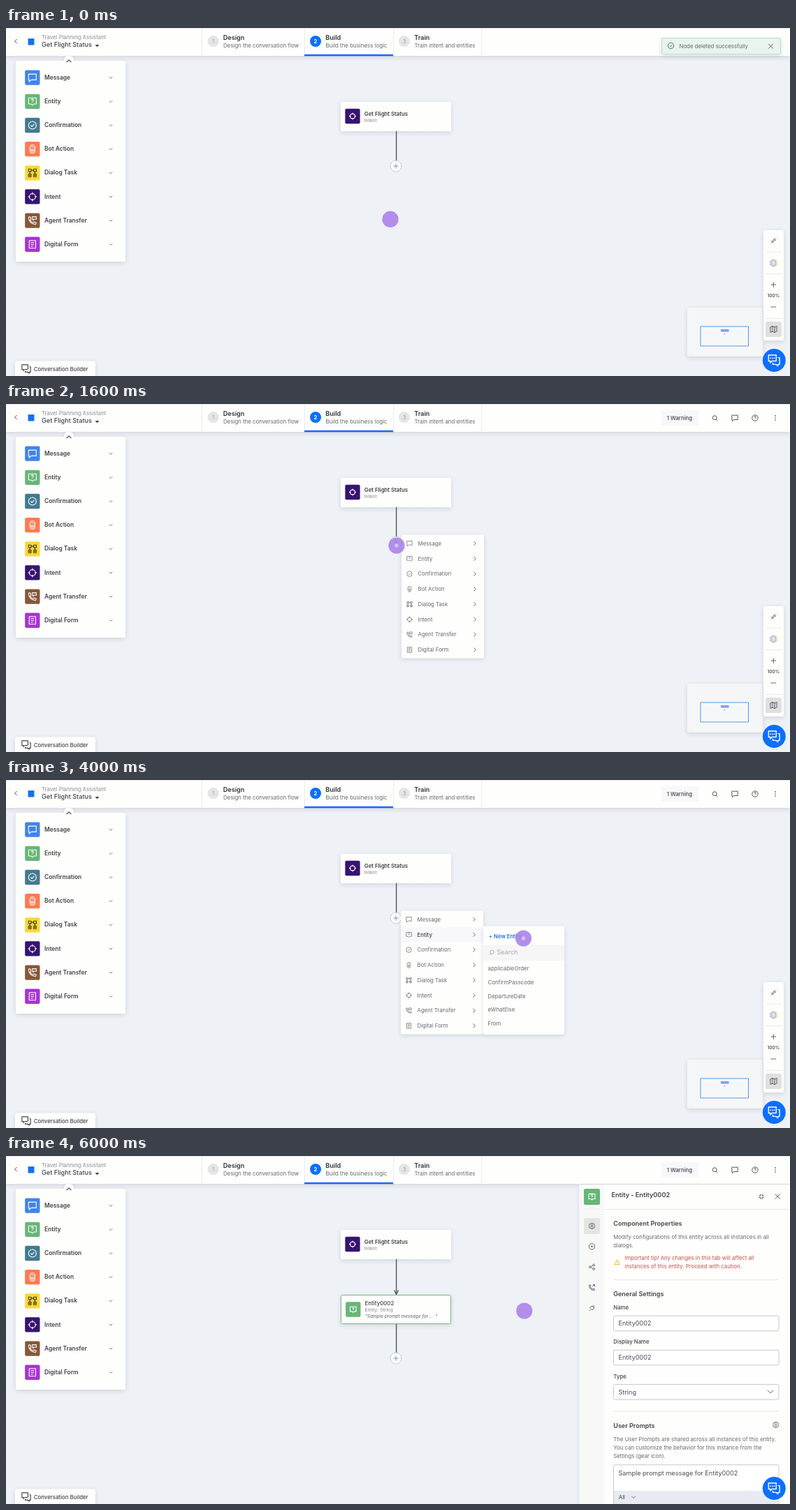
Write an HTML page with a canvas that moves like this. It is 1122 px wide and 499 px high and loops after 6400 ms.

```html
<!DOCTYPE html>
<html lang="en">
<head>
<meta charset="utf-8">
<title>Flow builder</title>
<style>
html, body { margin: 0; width: 100%; height: 100%; overflow: hidden; background: #eef1f5; }
canvas { display: block; width: 1122px; height: 499px; }
</style>
</head>
<body>
<canvas id="stage"></canvas>
<script>
const W = 1122, H = 499, LOOP = 6400;
const canvas = document.getElementById('stage');
const ratio = window.devicePixelRatio || 1;
canvas.width = W * ratio;
canvas.height = H * ratio;
const c = canvas.getContext('2d');

const INK = '#404247', GREY = '#66696f', BLUE = '#0d6efd', PAPER = '#fefefd', GREEN = '#67b577';

// Icons are drawn around 0,0 in a box of about 12 units.
const RING = 'M6 0A6 6 0 1 1-6 0A6 6 0 1 1 6 0';
const ICONS = {
  message: 'M-6-5.5H6V3.5H-2L-5 6.5V3.5H-6Z',
  entity: 'M-6-5.5H6V4H2L0 6L-2 4H-6ZM-1.5-2Q-1.5-3.5 0-3.5T1.5-2Q1.5-1 0-.4V.4M0 1.6V2.2',
  confirm: RING + 'M-2.7 0L-.7 2L3-2',
  bot: 'M-4-1V-3L-2-6H2L4-3V-1L2 1H-2ZM-1.5-2.5H1.5M-5 1L-3 3H3L5 1M-4 4L-2 6H2L4 4',
  dialog: 'M-6-6h4v4h-4ZM2-6h4v4h-4ZM-6 2h4v4h-4ZM2 2h4v4h-4ZM-2-4H2M-4-2V2M4-2V2M-5 4H-3M3 4H5',
  intent: 'M4.8 0A4.8 4.8 0 1 1-4.8 0A4.8 4.8 0 1 1 4.8 0M0-7V-3.4M0 7V3.4M-7 0H-3.4M7 0H3.4',
  agent: 'M-6-5L-3.5-6L-2-2.5L-3.5-1Q-1.5 2.5 1 3.5L2.5 2L6 3.5L5 6Q-5.5 5-6-5ZM0-6H6V-2H2.5L1-.5V-2H0Z',
  form: 'M-5-6H5V6H-5ZM-2.5-3H2.5M-2.5 0H2.5M-2.5 3H1',
  cross: 'M-5-5L5 5M5-5L-5 5',
  plus: 'M-6 0H6M0-6V6',
  minus: 'M-6 0H6',
  search: 'M4-1A4.5 4.5 0 1 1-5-1A4.5 4.5 0 1 1 4-1M2.5 2.5L6 6',
  lens: 'M-4-1A4.5 4.5 0 1 1 5-1A4.5 4.5 0 1 1-4-1M-2.5 2.5L-6 6',
  help: RING + 'M-1.8-1.5Q-1.8-3.3 0-3.3T1.8-1.5Q1.8-.5 0 .4V1.2M0 2.7V3.4',
  gear: 'M2 0A2 2 0 1 1-2 0A2 2 0 1 1 2 0M-1.5-6H1.5L2-4L4.4-4.4L6-1.5L4.7 0L6 1.5L4.4 4.4L2 4L1.5 6H-1.5L-2 4L-4.4 4.4L-6 1.5L-4.7 0L-6-1.5L-4.4-4.4L-2-4Z',
  target: RING + 'M-2 0H2M0-2V2',
  share: 'M-2 0A2 2 0 1 1-6 0A2 2 0 1 1-2 0M6-4A2 2 0 1 1 2-4A2 2 0 1 1 6-4M6 4A2 2 0 1 1 2 4A2 2 0 1 1 6 4M-2 0L2-4M-2 0L2 4',
  call: 'M-6-5L-3.5-6L-2-2.5L-3.5-1Q-1.5 2.5 1 3.5L2.5 2L6 3.5L5 6Q-5.5 5-6-5ZM1-2L6-6M6-2V-6H2',
  plug: 'M-6 6L-3 3M-4-1L1 4Q5 2 4-2L2-4Q-2-5-4-1M1-3L4-6M3-1L6-4',
  shrink: 'M-6 6L-1 1M-5 1H-1V5M6-6L1-1M5-1H1V-5',
  corners: 'M-6-2H-2V-6M6-2H2V-6M-6 2H-2V6M6 2H2V6',
  map: 'M-6-4L-2-6L2-4L6-6V4L2 6L-2 4L-6 6ZM-2-6V4M2-4V6',
  chats: 'M-6-6H3V1H-2L-4 3V1H-6ZM5-3H7V5H5V7L3 5H-1V3',
  down: 'M-3-1.5L0 1.5L3-1.5',
  up: 'M-3 1.5L0-1.5L3 1.5',
  left: 'M1.5-3L-1.5 0L1.5 3',
  right: 'M-1.5-3L1.5 0L-1.5 3'
};
const paths = {};
for (const name in ICONS) paths[name] = new Path2D(ICONS[name]);

const KINDS = [
  ['Message', 'message', '#4083ee'],
  ['Entity', 'entity', GREEN],
  ['Confirmation', 'confirm', '#447a91'],
  ['Bot Action', 'bot', '#fd7b50'],
  ['Dialog Task', 'dialog', '#fcd735'],
  ['Intent', 'intent', '#36146f'],
  ['Agent Transfer', 'agent', '#845839'],
  ['Digital Form', 'form', '#a833d3']
];

const POINTER = [
  [0, 550, 274.2], [400, 553, 257], [600, 555, 222], [800, 559, 203],
  [1800, 600, 214.5], [2000, 625, 224], [2200, 640, 225.7],
  [3600, 698, 228], [3800, 737, 229], [4000, 740.5, 227], [4400, 741.8, 222]
];

function icon(name, x, y, scale, color, weight = .9) {
  c.save();
  c.translate(x, y);
  c.scale(scale, scale);
  c.strokeStyle = color;
  c.lineWidth = weight / scale;
  c.lineJoin = 'round';
  c.stroke(paths[name]);
  c.restore();
}

// y is the middle of the capital letters.
function text(str, x, y, size = 7.8, color = GREY, weight = 400, style = '') {
  c.font = `${style} ${weight} ${size}px Inter, sans-serif`;
  c.fillStyle = color;
  c.fillText(str, x, y + size * .364);
}

function box(x, y, w, h, fill, radius = 0, border) {
  c.beginPath();
  c.roundRect(x, y, w, h, radius);
  if (fill) { c.fillStyle = fill; c.fill(); }
  if (border) { c.strokeStyle = border; c.lineWidth = 1; c.stroke(); }
}

function card(x, y, w, h, radius = 2, fill = PAPER) {
  c.save();
  c.shadowColor = 'rgba(50,52,60,.15)';
  c.shadowBlur = 6 * ratio;
  c.shadowOffsetY = 2 * ratio;
  box(x, y, w, h, fill, radius);
  c.restore();
}

function disc(x, y, r, fill, border, dash = []) {
  c.beginPath();
  c.arc(x, y, r, 0, 7);
  if (fill) { c.fillStyle = fill; c.fill(); }
  if (border) {
    c.strokeStyle = border;
    c.lineWidth = 1;
    c.setLineDash(dash);
    c.stroke();
    c.setLineDash([]);
  }
}

function rule(x, y, w, color = '#e8e8ea') { box(x, y, w, 1, color); }

function tile(kind, x, y, size, scale) {
  const [, name, color] = KINDS[kind];
  box(x - size / 2, y - size / 2, size, size, color, 2);
  icon(name, x, y, scale, name === 'dialog' ? '#3f3a20' : '#fff', 1.1);
}

function grid() {
  box(0, 0, W, H, '#eef1f5');
  c.fillStyle = '#e2e5ea';
  for (let y = 63; y < H; y += 22.5)
    for (let x = 2; x < W; x += 22.5) c.fillRect(Math.round(x), Math.round(y), 1, 1);
}

function header() {
  card(0, 0, W, 40, 0);
  rule(0, 0, W, '#ececec');
  icon('left', 14, 19, 1, INK);
  box(31.5, 15, 9, 9.5, '#1673ea', 1);
  text('Travel Planning Assistant', 51, 13, 7.8, '#8b8d92');
  text('Get Flight Status', 51, 23.8, 9.1, INK, 500);
  c.fillStyle = INK;
  c.fill(new Path2D('M127.5 24H133.5L130.5 27.3Z'));

  for (const x of [280, 427, 554, 680]) box(x, 0, 1, 40, '#ececee');
  const steps = [
    [296.5, 'Design', 'Design the conversation flow'],
    [443, 'Build', 'Build the business logic'],
    [570, 'Train', 'Train intent and entities']
  ];
  steps.forEach(([x, title, note], i) => {
    const on = i === 1;
    disc(x, 19, 8, on ? BLUE : '#e5e5e6');
    c.textAlign = 'center';
    text(String(i + 1), x, 19.2, 7.6, on ? '#fff' : '#98999d', on ? 700 : 400);
    c.textAlign = 'left';
    text(title, x + 14.2, 13.3, 9.1, '#303237', 600);
    text(note, x + 14.4, 25, 7.9);
  });
  box(427, 37.8, 127, 2.4, BLUE);
}

function actions() {
  box(938, 9, 53, 22, '#f8f8fb', 2);
  text('1 Warning', 945.7, 20, 7.8, INK, 500);
  icon('search', 1014.5, 20.3, .65, INK);
  icon('message', 1043, 20, .7, INK);
  icon('help', 1072, 20, .71, INK);
  for (const y of [16.9, 20, 23.1]) disc(1101, y, .8, INK);
}

function toast() {
  card(938, 14, 171, 24, 2, '#e8f4ed');
  box(938.5, 14.5, 170, 23, null, 2, '#b9dec8');
  icon('confirm', 951.5, 25.3, .68, '#38694e');
  text('Node deleted successfully', 963.5, 26.2, 7.84, '#646a67');
  icon('cross', 1094.5, 26.2, .68, '#4c5851');
}

function palette() {
  card(82.5, 39.5, 15, 15, 7.5);
  card(14, 47, 157, 288);
  icon('up', 90, 47.5, 1.1, INK, 1.2);
  KINDS.forEach(([label], i) => {
    const y = 71.2 + i * 34.15;
    tile(i, 37.8, y, 21.3, .92);
    text(label, 55, y - .4, 8.42, INK, 600);
    icon('down', 150, y, .7, '#66686d');
  });
}

function plusButton(y) {
  disc(558, y, 7.8, PAPER, '#a4a7ac', [1.6, 1.2]);
  icon('plus', 558, y, .6, '#5ba2ec', 1.1);
}

function stem(from, to) { box(557.9, from, 1.4, to - from, '#505358'); }

function nodes(two, selected) {
  card(479, 106, 158, 42);
  tile(5, 496, 126.5, 21.3, .72);
  text('Get Flight Status', 512.8, 122.9, 7.8, INK, 600);
  text('Intent', 512.7, 132.2, 6.7, '#85888d');
  if (!two) {
    stem(148, 190);
    plusButton(198);
    return;
  }
  stem(148, 198);
  c.strokeStyle = '#505358';
  c.lineWidth = 1.3;
  c.stroke(new Path2D('M555.6 192.3L558.6 198.6L561.6 192.3'));
  card(479, 199, 158, 42);
  if (selected) box(479.5, 199.5, 157, 41, null, 2, '#76b985');
  const dx = selected ? .8 : 0;
  tile(1, 496 + dx, 220, 21.3, .72);
  text('Entity0002', 512.8 + dx, 211, 7.9, INK, 500);
  text('Entity: String', 512.7 + dx, 220.4, 6.7, '#85888d');
  text('"Sample prompt message for ...', 512.9 + dx, 230, 6.5, '#5c5f65', 400, 'italic');
  text('"', 613.5 + dx, 230, 6.5, '#5c5f65', 400, 'italic');
  stem(241, 282);
  plusButton(290);
}

function menu(x, hover) {
  card(x, 187.5, 118, 177);
  if (hover) box(x, 211, 118, 21.5, '#f8f8fb');
  KINDS.forEach(([label, name], i) => {
    const y = 200 + i * 21.78, on = hover && i === 1;
    icon(name, x + 11.5, y, .62, '#686b70', .75);
    text(label, x + 23.6, y - .1, 7.8, on ? INK : GREY, on ? 500 : 400);
    icon('right', x + 105, y, .95, '#5c5f64', .95);
  });
}

function submenu() {
  card(683, 209.5, 116, 155.5);
  text('+ New Entity', 691, 224, 7.7, '#1a75dd', 600);
  box(683, 236, 116, 23, '#f6f6f7');
  icon('lens', 695.2, 247.3, .6, '#9a9ca1', .8);
  text('Search', 702.5, 247.2, 9, '#a5a7ab');
  ['applicableOrder', 'ConfirmPasscode', 'DepartureDate', 'eWhatElse', 'From']
    .forEach((label, i) => text(label, 689.6, 270 + i * 19.85));
}

function minimap(two) {
  card(975, 401, 108, 70, 2, '#f5f6f7');
  const top = two ? 425.5 : 428;
  box(994, top, 68.5, 28, '#f6f7f8', 0, '#4f9ae8');
  const y = two ? 429.5 : 432;
  box(1023, y, 11.5, 3.6, '#8a9df2');
  if (two) box(1023, y + 5.4, 11.5, 3.6, '#8a9df2');
  disc(1028, y + (two ? 11.5 : 6.8), .8, '#5b86ea');
}

function tools(two) {
  card(1084, 290, 29, 158);
  for (const y of [320.5, 352, 416]) rule(1087, y, 23);
  icon('shrink', 1098.5, 305, .62, INK, .8);
  box(1096, 332.5, 5, 9, null, 1.5, '#85888d');
  for (const y of [334.7, 337, 339.3]) disc(1098.5, y, .6, '#74777c');
  [[1093.8, '#8fb0ee'], [1103.2, '#e6c766']].forEach(([x, color]) =>
    box(x - .5, 333, 1, 8, two ? '#a4a7ac' : color));
  icon('plus', 1098.3, 368, .64, INK, .8);
  text('100%', 1089.6, 384, 6.6, INK, 500);
  icon('minus', 1098.3, 400, .64, INK, .8);
  box(1087, 421, 23, 22, '#e0e0e1', 2);
  icon('map', 1098.5, 432, .76, INK, .85);
}

function builderTab() {
  card(13, 477.5, 115, 26, 4);
  icon('chats', 28.5, 488.6, .95, INK, 1.1);
  text('Conversation Builder', 39.8, 489.4, 7.8, INK, 500);
}

function field(label, value, y) {
  text(label, 869.3, y - 22.5, 7.8, INK, 500);
  box(869.5, y - 10.7, 236.5, 21.5, '#fff', 2, '#c6c8cd');
  text(value, 876.5, y - .1, 9.1, '#4b4e54');
}

function panel() {
  card(820.5, 41, 302, 462, 0);
  box(820.5, 41, 35.5, 458, '#f8f8f9');
  tile(1, 838.5, 58.5, 23, .75);
  rule(827, 75.5, 23);
  box(827, 89, 23, 23, '#e4e4e5', 2);
  ['gear', 'target', 'share', 'call', 'plug'].forEach((name, i) =>
    icon(name, 838.5, 100.3 + i * 29.45, .68, '#53565c'));

  text('Entity - Entity0002', 866.5, 56, 9.15, INK, 600);
  icon('corners', 1081, 58.3, .6, INK);
  icon('cross', 1104.3, 58, .72, INK);
  rule(856, 76, 266);

  text('Component Properties', 869.3, 97, 9, INK, 600);
  text('Modify configurations of this entity across all instances in all', 869.3, 116);
  text('dialogs.', 869.3, 128);
  c.strokeStyle = '#f0bd45';
  c.lineWidth = 1;
  c.stroke(new Path2D('M870.5 155.5L874.5 148.5L878.5 155.5ZM874.5 151V153M874.5 154V154.6'));
  text('Important tip! Any changes in this tab will affect all', 885.3, 146, 7.8, '#c5524e');
  text('instances of this entity. Proceed with caution.', 885.3, 158, 7.8, '#c5524e');
  rule(869.5, 177, 236.5);

  text('General Settings', 869.3, 198, 9, INK, 600);
  field('Name', 'Entity0002', 240);
  field('Display Name', 'Entity0002', 289);
  field('Type', 'String', 338.3);
  icon('down', 1094, 338, 1.4, '#53565c');
  rule(869.5, 365.5, 236.5);

  text('User Prompts', 869.3, 386.3, 9, INK, 600);
  icon('gear', 1101.7, 385.5, .68, '#53565c');
  text('The User Prompts are shared across all instances of this entity.', 869.3, 406.6);
  text('You can customize the behavior for this instance from the', 869.3, 418);
  text('Settings (gear icon).', 869.3, 430);
  box(869.5, 442.8, 236.5, 60, '#fff', 2, '#c6c8cd');
  text('Sample prompt message for Entity0002', 876.5, 455, 9.1, '#4b4e54');
  box(870, 480, 235.5, 19, '#e7eaf1');
  text('All', 876.8, 489.3, 7.8, INK);
  icon('down', 898, 489.3, .9, '#62656b');
}

function chatButton() {
  disc(1099.3, 476.6, 16.5, BLUE);
  icon('chats', 1098.6, 476.3, 1.22, '#fff', 1.4);
  for (const x of [1094.2, 1096.8, 1099.4]) disc(x, 473.3, .9, '#fff');
}

function pointer(t) {
  const [, x, y] = POINTER.findLast(p => p[0] <= t);
  c.globalAlpha = .9;
  disc(x, y, 11.6, '#ab82e9');
  c.globalAlpha = 1;
  const pressed = [[1000, 1800], [4000, 4400], [5000, 6000]].some(([a, b]) => t >= a && t < b);
  if (pressed) disc(x, y, 2.8, '#d6c0f5');
}

function draw(t) {
  const two = t >= 4400, open = t >= 5400;
  c.setTransform(ratio, 0, 0, ratio, 0, 0);
  grid();
  nodes(two, open);
  header();
  if (t < 600) toast(); else actions();
  palette();
  builderTab();
  if (t >= 1200 && !two) menu(t < 2800 ? 566 : 565, t >= 1800);
  if (t >= 2800 && !two) submenu();
  if (open) panel();
  else { minimap(two); tools(two); }
  chatButton();
  pointer(t);
}

function tick() {
  draw(performance.now() % LOOP);
  requestAnimationFrame(tick);
}
tick();
</script>
</body>
</html>
```
